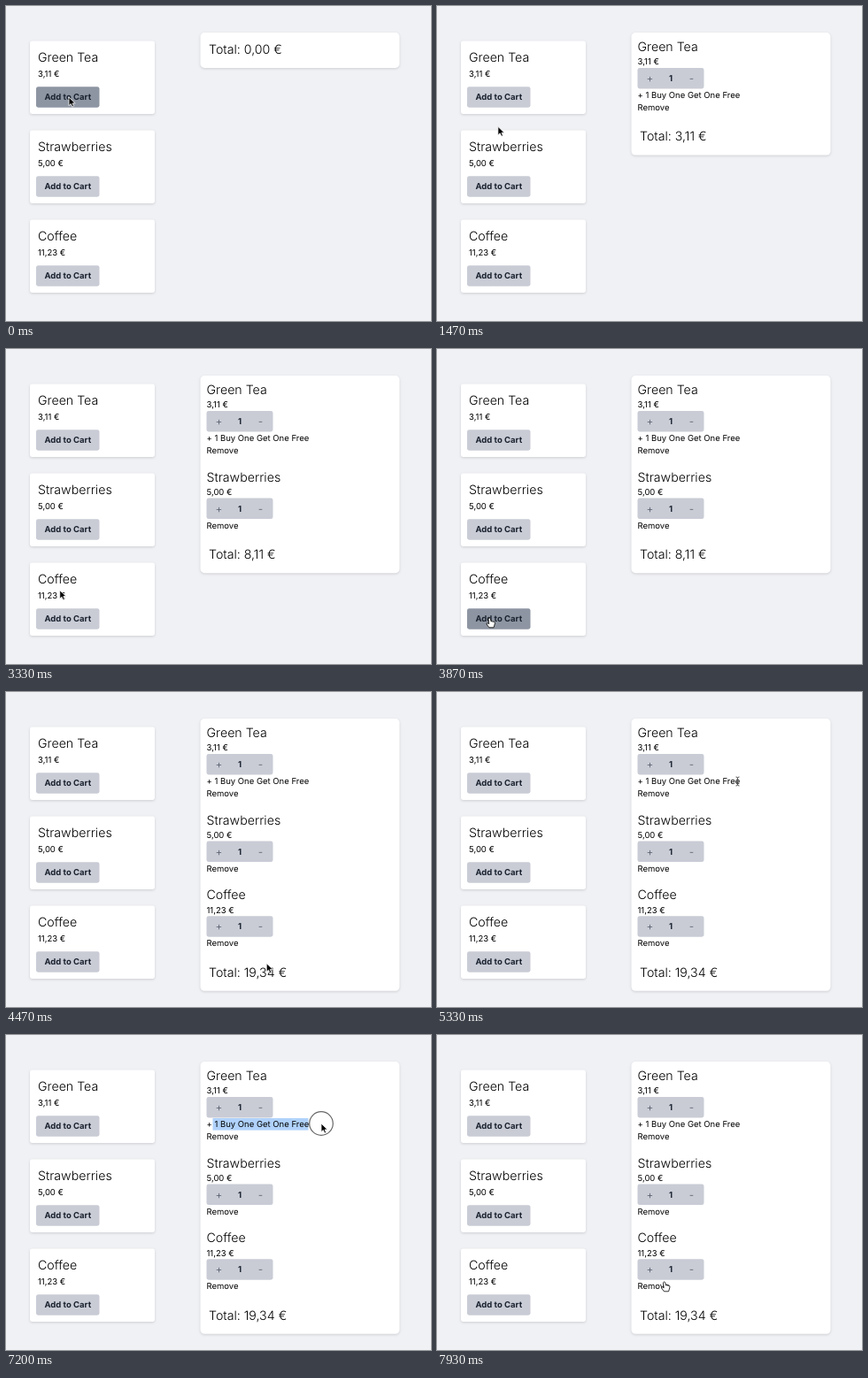
Write an HTML page that moves like this. It is 480 px wide and 356 px high and loops after 8000 ms.

```html
<!DOCTYPE html>
<html lang="en">
<head>
<meta charset="utf-8">
<title>Shopping cart</title>
<style>
html, body { margin: 0; width: 100%; height: 100%; overflow: hidden; background: #f0f1f5; }
svg {
  display: block; font: 400 9.5px Inter, sans-serif;
  text-rendering: geometricPrecision; cursor: default; user-select: none;
}
.card { fill: #fff; filter: drop-shadow(0 1.8px 1.6px #00000024); }
.title { font-size: 14.2px; font-weight: 350; }
.btn { fill: #c9ccd5; }
.btn.hover { fill: #8e95a2; }
.bold { font-weight: 700; fill: #1a222f; text-anchor: middle; }
.sign { font-size: 12px; font-weight: 300; fill: #4b5362; text-anchor: middle; }
#beam { filter: drop-shadow(0 0 .5px #fff); }
</style>
</head>
<body>
<svg id="stage" width="480" height="356" viewBox="0 0 480 356"></svg>
<script>
const FPS = 15, TICKS = 120;
const CARD_PITCH = 101, ROW = 84.6, PROMO_ROW = 14;
const PROMO = { left: 233.5, right: 341.5, top: 94, height: 13.6 };

// times below are in ticks of 1/15 s
const products = [
  { name: 'Green Tea', price: 3.11, added: 16, promo: '+ 1 Buy One Get One Free' },
  { name: 'Strawberries', price: 5, added: 39 },
  { name: 'Coffee', price: 11.23, added: 61 }
];
const start = { x: 71, y: 103 };
const moves = [
  { from: 19, to: 32, x: 65, y: 197 },
  { from: 45, to: 55, x: 59, y: 304 },
  { from: 60, to: 70, x: 323, y: 307 },
  { from: 70, to: 80, x: 339.5, y: 101 },
  { from: 83, to: 93, x: 234, y: 101 },
  { from: 97, to: 103, x: 356, y: 100 },
  { from: 113, to: 119, x: 256.5, y: 279 }
];
const drag = { from: 84, to: 93 }, deselect = 109;
const presses = [{ from: 11, to: 13 }, { from: 35, to: 37 }, { from: 56, to: 58 }, drag, { from: 108, to: 110 }];

const euro = v => v.toFixed(2).replace('.', ',') + ' €';
const rowHeight = p => ROW + (p.promo ? PROMO_ROW : 0);
const sum = (list, f) => list.reduce((total, p) => total + f(p), 0);

const text = (x, y, str, cls = '') => `<text x="${x}" y="${y}" class="${cls}">${str}</text>`;
const rect = (x, y, w, h, r, attrs) =>
  `<rect x="${x}" y="${y}" width="${w}" height="${h}" rx="${r}" ${attrs}/>`;

const shop = products.map((p, i) => `<g transform="translate(0 ${i * CARD_PITCH})">
  ${rect(27, 39.5, 141, 82.5, 2.4, 'class="card"')}
  ${text(36, 63, p.name, 'title')}
  ${text(36, 80.4, euro(p.price))}
  ${rect(34, 91.2, 71.5, 23.5, 2.4, 'class="btn shop"')}
  ${text(69.8, 106.4, 'Add to Cart', 'bold')}</g>`).join('');

const items = products.map((p, i) => `
  <g class="item" transform="translate(0 ${sum(products.slice(0, i), rowHeight)})">
  ${text(226.5, 51.2, p.name, 'title')}
  ${text(226.5, 66.4, euro(p.price))}
  ${rect(226.5, 70, 75, 23.5, 2.4, 'class="btn"')}
  ${text(240.5, 86, '+', 'sign')}${text(264, 85.2, '1', 'bold')}${text(287.5, 86, '-', 'sign')}
  ${p.promo ? text(226.5, 104, p.promo) : ''}
  ${text(226.5, p.promo ? 104 + PROMO_ROW : 104, 'Remove')}</g>`).join('');

stage.innerHTML = `${shop}
  ${rect(219.5, 30, 225, 40, 4.7, 'class="card" id="panel"')}
  ${rect(0, PROMO.top, 0, PROMO.height, 0, 'id="selection" fill="#b0d2fb"')}
  ${items}
  <text x="229" id="total" class="title"></text>
  <circle id="ring" fill="none" stroke="#0009" stroke-width="1.2"/>
  <g id="pointer" stroke-linejoin="round">
    <path id="arrow" d="M0 0V9.6L2.3 7.5 3.9 11 5.6 10.2 4.1 6.9H7.2Z" fill="#000" stroke="#fff" stroke-width=".8"/>
    <path id="hand" d="M-1 1Q0-1.5 1.4 1L2.1 4Q2.9 3.2 3.7 4.1 6.5 3.5 6.5 5.8L5.1 10.8H-.1L-2.9 7Q-3.2 5.6-1.9 5.7L-.3 6.8Z" fill="#fff" stroke="#000" stroke-width=".8"/>
    <path id="beam" d="M-2-5Q0-5 0-3.8 0-5 2-5M0-4V4M-2 5Q0 5 0 3.8 0 5 2 5M-1 1.7H1" fill="none" stroke="#333" stroke-width=".8"/>
  </g>`;

const $ = id => document.getElementById(id);
const buttons = document.querySelectorAll('.shop');
const rows = document.querySelectorAll('.item');
const show = (el, on) => el.setAttribute('visibility', on ? 'visible' : 'hidden');
const set = (el, attrs) => Object.entries(attrs).forEach(([k, v]) => el.setAttribute(k, v));
const inside = (p, l, t, r, b) => p.x >= l && p.x <= r && p.y >= t && p.y <= b;
const during = (n, span) => n >= span.from && n < span.to;

// each move slows down towards its end
function pointerAt(n) {
  return moves.reduce((p, m) => {
    const t = Math.min(1, Math.max(0, (n - m.from) / (m.to - m.from)));
    const k = Math.sin(t * Math.PI / 2);
    return { x: p.x + (m.x - p.x) * k, y: p.y + (m.y - p.y) * k };
  }, start);
}

function draw(ms) {
  const n = Math.floor((ms + 5) * FPS / 1000) % TICKS;
  const pos = pointerAt(n);

  const cart = products.filter(p => n >= p.added);
  const growth = sum(cart, rowHeight);
  rows.forEach((row, i) => show(row, i < cart.length));
  set($('panel'), { height: 40 + growth });
  set($('total'), { y: 53.8 + growth });
  $('total').textContent = 'Total: ' + euro(sum(cart, p => p.price));

  let over = false;
  buttons.forEach((b, i) => {
    const top = 91 + i * CARD_PITCH;
    const hover = inside(pos, 34, top, 105, top + 24);
    b.classList.toggle('hover', hover);
    over ||= hover;
  });

  const dragged = during(n, drag) ? pos.x : PROMO.left;
  const left = Math.min(PROMO.right, Math.max(PROMO.left, dragged));
  set($('selection'), { x: left, width: PROMO.right - left });
  show($('selection'), n >= drag.from && n < deselect);

  const hand = n > moves[0].from && (over || inside(pos, 227, 277, 262, 291));
  const beam = cart.length > 0 && inside(pos, 226, PROMO.top, 343, 108);
  show($('hand'), hand);
  show($('beam'), beam);
  show($('arrow'), !hand && !beam);
  set($('pointer'), { transform: `translate(${pos.x} ${pos.y})` });

  show($('ring'), presses.some(p => during(n, p)));
  set($('ring'), { cx: pos.x, cy: pos.y, r: hand ? 17.7 : 13.3 });
}

function loop(now) {
  draw(now);
  requestAnimationFrame(loop);
}
draw(0);
requestAnimationFrame(loop);
</script>
</body>
</html>
```
